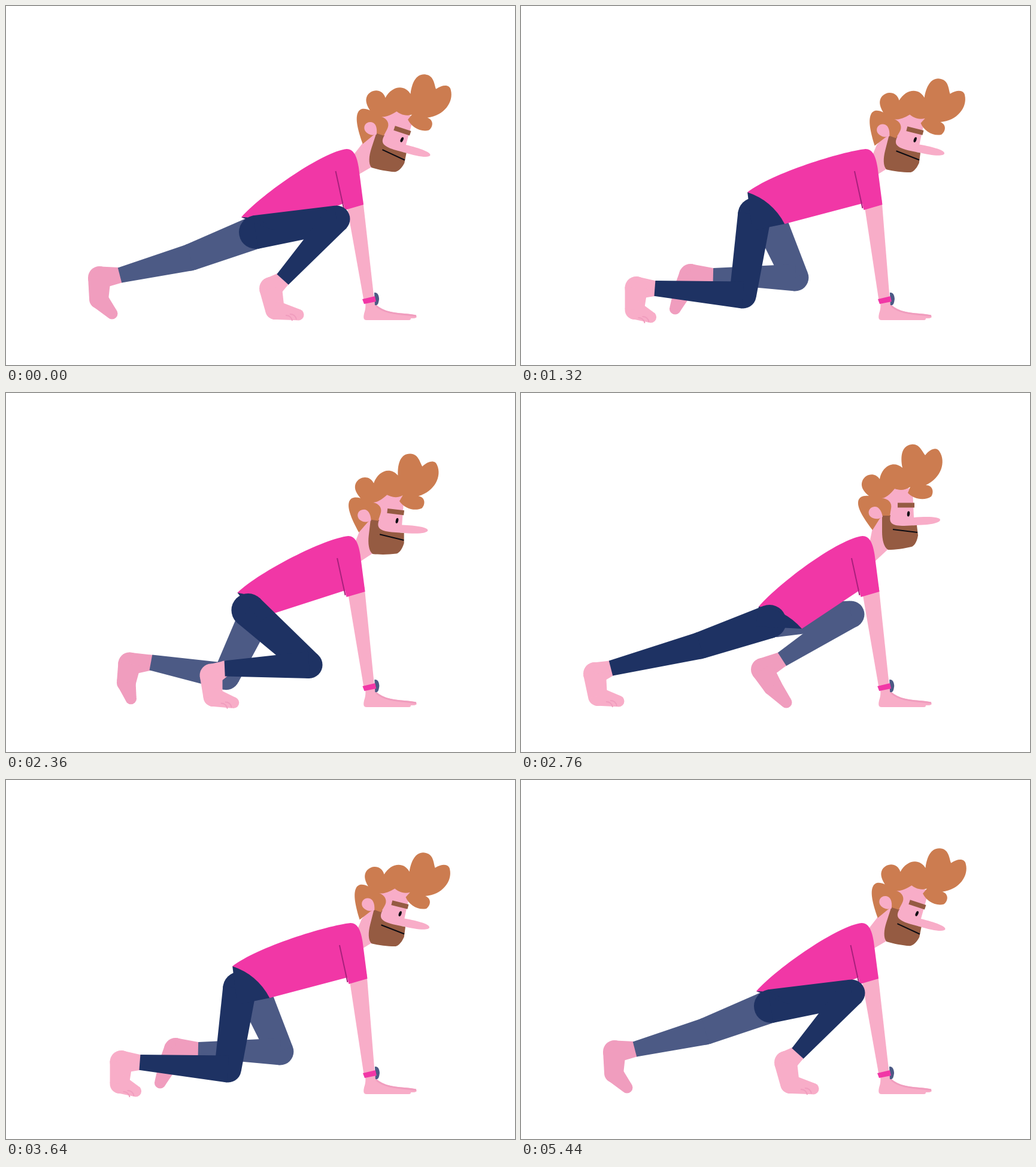
These frames come from a looping animation (850 px wide and 600 px high, 5.48 s). An HTML page with a canvas:

```html
<!DOCTYPE html>
<html lang="en">
<head>
<meta charset="utf-8">
<title>Mountain climbers</title>
<style>
html, body { margin: 0; width: 100%; height: 100%; overflow: hidden; background: #fff; }
canvas { display: block; }
</style>
</head>
<body>
<canvas id="stage" width="850" height="600"></canvas>
<script>
const g = document.getElementById('stage').getContext('2d');
const SKIN = '#f8adc8', SKIN_DARK = '#f09dbe', HAIR = '#cc7c50', BEARD = '#955b42', INK = '#0b0b12';
const SHIRT = '#f137a6', NAVY = '#1e3263', NAVY_LIGHT = '#4c5a85';
const LOOP = 5480;

// Half widths along a leg and a foot
const HIP = 28, KNEE = 22.5, ANKLE = 13, HEEL = 19, BALL = 16, TOE = 9.5;

const pts = s => s.split(' ').map(p => p.split(',').map(Number));
const lerp = (a, b, u) => a + (b - a) * u;
const mix = (a, b, u) => a.map((v, i) => lerp(v, b[i], u));
const add = (p, x, y) => [p[0] + x, p[1] + y];
const dist = (p, q) => Math.hypot(q[0] - p[0], q[1] - p[1]);
const polar = (p, a, r) => add(p, Math.cos(a) * r, Math.sin(a) * r);
const heading = (p, q) => Math.atan2(q[1] - p[1], q[0] - p[0]);

// Leg: hip, knee, ankle, heel, ball, toe. Waist: hem at the back and at the front.
// Head: ear x, ear y, tilt of the face, tilt of the hair.
const lunge = {
  near: '417,378 552,356 462,457 442,472 449,508 488,516',
  far: '425,375 308,420 190,450 156,454 155,490 177,514',
  waist: '393,353 450,375', lean: 0, head: [609.5, 204.5, 18, 18]
};
const land = {
  ...lunge, near: '414,373 548,349 458,451 436,470 458,487 492,514',
  waist: '392,349 450,372', head: [593.3, 201, 1, 0.5]
};
const rest = {
  ...land, near: '414,373 549,350 459,453 442,472 449,508 488,516', head: [594, 203, 1.5, 1]
};
const tuck = {
  near: '390,348 371,483 224,472 193,471 190,508 217,520',
  far: '412,350 457,454 320,451 282,450 270,474 256,506',
  waist: '378,311 440,364', lean: 6.5, head: [605.5, 208, 14.5, 20.5]
};
const stretch = {
  near: '415,382 299,422 150,460 123,469 128,507 163,515',
  far: '425,380 551,370 436,445 403,462 420,490 443,517',
  waist: '397,357 469,394', lean: 1.5, head: [592, 200, 0, 0]
};
const drive = {
  near: '399,349 517,409 384,438 358,437 354,472 348,506',
  far: '407,362 333,431 194,457 158,457 157,493 179,515',
  waist: '380,319 440,374', lean: 3, head: [604.2, 207.6, 11, 16]
};

// The knee is kept as two bone lengths and solved again while moving
function packLeg(s) {
  const [hip, knee, ...rest] = pts(s);
  return [dist(hip, knee), dist(knee, rest[0]), ...hip, ...rest.flat()];
}
function unpackLeg([thigh, shin, ...v]) {
  const [hip, ...foot] = v.flatMap((x, i) => i % 2 ? [] : [[x, v[i + 1]]]);
  const d = dist(hip, foot[0]);
  const cos = (thigh ** 2 + d ** 2 - shin ** 2) / (2 * thigh * d);
  const bend = Math.acos(Math.max(-1, Math.min(1, cos)));
  return [hip, polar(hip, heading(hip, foot[0]) - bend, thigh), ...foot];
}
const pack = p => ({
  near: packLeg(p.near), far: packLeg(p.far),
  body: [...pts(p.waist).flat(), p.lean], head: p.head
});
const blend = (p, q, u) => Object.fromEntries(Object.keys(p).map(k => [k, mix(p[k], q[k], u)]));

const poses = {};
for (const [name, p] of Object.entries({ lunge, land, rest, tuck, stretch, drive })) poses[name] = pack(p);
poses.sink = blend(poses.rest, poses.lunge, 1.08);

const speedUp = u => u ** 1.5, slowDown = u => 1 - (1 - u) ** 1.8;
const smooth = u => u * u * (3 - 2 * u), late = u => u ** 2.8;

// Sink, then three full climbs, then settle into the lunge
const keys = [[0, 'lunge'], [200, 'sink', slowDown], [560, 'lunge', speedUp], [900, 'rest', slowDown], [1060, 'rest']];
for (let t = 1160; t < 4000; t += 1160) keys.push(
  [t + 160, 'tuck', speedUp], [t + 400, 'stretch', slowDown], [t + 475, 'stretch'],
  [t + 800, 'drive', speedUp], [t + 920, 'land', slowDown], [t + 1000, 'rest', smooth], [t + 1060, 'rest']);
keys.splice(-1, 1, [5440, 'lunge', late], [LOOP, 'lunge']);

const paint = (d, color) => { g.fillStyle = color; g.fill(new Path2D(d)); };
function line(d, color, width) {
  g.strokeStyle = color;
  g.lineWidth = width;
  g.stroke(new Path2D(d));
}
const polygon = (list, color) => paint('M' + list.join('L') + 'Z', color);
function dot(p, r, color) {
  g.beginPath();
  g.arc(...p, r, 0, 7);
  g.fillStyle = color;
  g.fill();
}
function taper(p, q, r, s, color) {
  const a = heading(p, q) + Math.PI / 2;
  polygon([polar(p, a, r), polar(q, a, s), polar(q, a, -s), polar(p, a, -r)], color);
}
// A chain of tapering pieces with round joints
function limb(joints, radii, color) {
  joints.forEach((p, i) => {
    dot(p, radii[i], color);
    if (i) taper(joints[i - 1], p, radii[i - 1], radii[i], color);
  });
}

function drawLeg([hip, knee, ankle, ...foot], color, skin, toes) {
  limb([ankle, ...foot], [ANKLE, HEEL, BALL, TOE], skin);
  if (toes) for (const [x, y] of [[-21, 1], [-14, -1]]) {
    const [tx, ty] = add(foot[2], x, y);
    line(`M${tx} ${ty}q9 0 11 9`, SKIN_DARK, 2);
  }
  limb([hip, knee], [HIP, KNEE], color);
  taper(knee, ankle, KNEE, ANKLE, color);
}

const hem = (back, front) => {
  const [w, h] = add(front, -back[0], -back[1]);
  return `M${back}Q${add(mix(back, front, 0.5), h * 0.2, -w * 0.2)} ${front}`;
};

function drawShirt(back, front, lean) {
  const at = (x, y) => [x + lean, y];
  const top = at(569, 239);
  const rise = add(mix(back, top, 0.21), 0, -17);
  const pit = at(564, 338);
  paint(`M${back}C${rise} ${add(top, -39, 4)} ${top}C${at(580, 239)} ${at(586, 250)} ${at(589, 270)}` +
    `L${at(597, 332)}L${at(566, 341)}L${at(563.5, 330)}L${front}Z`, SHIRT);
  line(`M${at(550.5, 276)}L${pit}`, '#a8207c', 2);
}

function drawArm(lean) {
  const dx = lean / 7;
  paint('M600 495L616 492L618 500C634 515 662 512 682 516C688 518 686 522 681 522L676 522C676 525 674 525 671 525L602 525C596 525 597 519 598 514C600 508 601 503 600 495Z', SKIN);
  line('M618 501C635 516 660 514 685 518', SKIN_DARK, 3);
  polygon([[569 + lean * 0.7, 333], [596 + lean, 324], [615 + dx, 492], [598, 495]], SKIN);
  g.save();
  g.translate(dx, 0);
  paint('M615 479C621 478 623 485 623 490C622 497 621 501 616 500Z', NAVY_LIGHT);
  paint('M595 490L616 485L618 494L598 498Z', SHIRT);
  g.restore();
}

function tilted(x, y, deg, draw) {
  g.save();
  g.translate(x, y);
  g.rotate(deg * Math.PI / 180);
  g.translate(-592, -200);
  draw();
  g.restore();
}

function drawHead([x, y, face, hair], lean) {
  const ear = [592, 200];
  const at = (...p) => polar([x, y], heading(ear, p) + face * Math.PI / 180, dist(ear, p));
  polygon([[581 + lean, 248], at(587, 226), at(603, 205), at(613, 261), [590 + lean, 281]], SKIN);
  tilted(x, y, face, () => {
    paint('M587 230L600 175L625 157L654 160L656 208C680 206 700 207 700 212C700 217 683 221 655 221L612 260Z', SKIN);
    paint('M603 204L617 204C614 218 620 222 640 222L661 221L663 238C661 250 656 256 652 257C640 260 625 262 613 262C606 258 603 245 603 232Z', BEARD);
  });
  tilted(x, y, hair, () => paint('M587 229C570 207 562 192 563 182C564 173 572 171 581 172C570 163 567 155 570 147C575 135 591 132 599 144C603 122 622 112 637 125C633 105 636 88 652 86C665 84 670 98 675 104C684 92 695 90 699 98C710 115 702 142 676 154C688 154 690 166 685 173C673 181 655 177 646 167L650 157C640 164 630 162 624 160C616 170 608 176 602 176C614 176 620 184 618 193L616 205L604 205L599 210Z', HAIR));
  tilted(x, y, face, () => {
    paint('M604 207C602 195 596 189 590 190C581 191 578 200 583 206C588 211 596 211 600 209Z', SKIN);
    paint('M629 183.5h28v8h-28Z', BEARD);
    g.beginPath();
    g.ellipse(647, 202, 2.2, 4.5, 0.1, 0, 7);
    g.fillStyle = INK;
    g.fill();
    line('M621 228L662 233', INK, 2);
  });
}

function draw(now) {
  const t = now % LOOP;
  const n = keys.findIndex(k => k[0] > t);
  const [t0, from] = keys[n - 1], [t1, to, ease = smooth] = keys[n];
  const p = blend(poses[from], poses[to], ease((t - t0) / (t1 - t0)));
  const [bx, by, fx, fy, lean] = p.body;
  const back = [bx, by], front = [fx, fy];
  const near = unpackLeg(p.near);
  const inAir = to === 'drive' || to === 'land' || from === 'land';

  g.fillStyle = '#fff';
  g.fillRect(0, 0, 850, 600);
  drawLeg(unpackLeg(p.far), NAVY_LIGHT, SKIN_DARK, false);
  drawArm(lean);
  drawHead(p.head, lean);
  drawShirt(back, front, lean);
  drawLeg(near, NAVY, SKIN, !inAir);
  paint(`${hem(back, front)}L${mix(near[0], near[1], 0.2)}Z`, NAVY);
  requestAnimationFrame(() => draw(performance.now() - start));
}
const start = performance.now();
draw(0);
</script>
</body>
</html>
```
